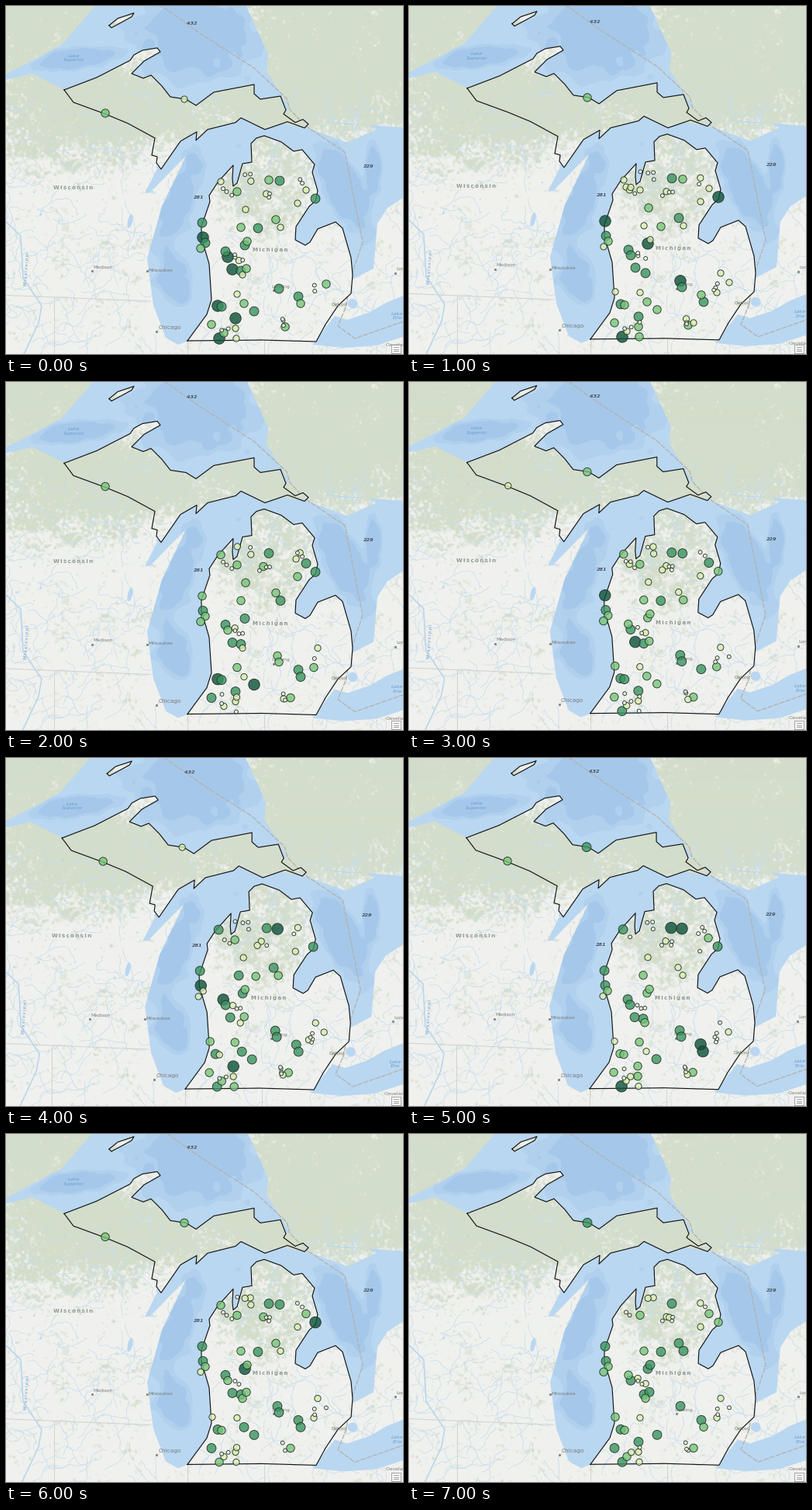
Animation of 512x448 px, one loop 8 s. Source, as a matplotlib script:

```python
import numpy as np
import matplotlib.pyplot as plt
from matplotlib.animation import FuncAnimation
from matplotlib.collections import LineCollection
from matplotlib.colors import to_rgb, to_rgba_array
from matplotlib.patches import PathPatch, Ellipse, Rectangle
from matplotlib.path import Path

W, H, DPI = 512, 448, 100
PT = 72 / DPI
FRAMES = 8
rng = np.random.default_rng(12)

LAND, FOREST = "#f0f1ee", "#d3ddcb"
WATER, DEEP, RIVER = "#bad7f1", "#a3c7ea", "#c9ddec"
GREY, BLUE, INK = "#7b7b7b", "#6d9dcc", "#46525e"

# Key points of the coasts
UPPER = [(75, 108), (117, 92), (160, 70), (165, 63), (176, 57), (195, 54),
         (199, 59), (178, 71), (162, 87), (177, 93), (187, 89), (201, 103),
         (212, 117), (232, 120), (245, 128), (268, 111), (320, 101),
         (320, 113), (328, 120), (354, 116), (361, 134), (358, 139),
         (373, 150), (383, 146), (390, 152), (385, 157), (363, 149),
         (334, 159), (303, 144), (296, 150), (260, 159), (245, 173),
         (246, 162), (225, 174), (200, 210), (194, 202), (195, 194),
         (188, 192), (192, 170), (157, 151), (128, 139), (87, 124)]
LOWER = [(234, 431), (259, 397), (265, 378), (262, 332), (252, 298),
         (252, 284), (263, 252), (262, 244), (273, 227), (293, 205),
         (292, 222), (293, 232), (298, 228), (305, 203), (317, 201),
         (316, 177), (323, 170), (333, 167), (355, 175), (371, 187),
         (382, 185), (398, 204), (395, 214), (402, 238), (399, 251),
         (391, 258), (374, 284), (373, 301), (386, 308), (392, 304),
         (402, 287), (425, 278), (434, 286), (445, 324), (447, 346),
         (445, 370), (428, 386), (412, 410), (400, 432), (331, 430)]
ISLE = [(133, 25), (144, 16), (165, 9), (162, 14), (136, 28)]
MANITOULIN = [(402, 158), (420, 154), (468, 152), (476, 160), (442, 174)]
LAKES = [
    [(-8, 97), (34, 87), (76, 108), (130, 140), (345, 140), (366, 132),
     (336, 84), (338, 62), (318, 18), (306, -8), (122, -8), (72, 50), (-8, 92)],
    [(235, 431), (222, 436), (206, 427), (190, 385), (182, 325), (201, 258),
     (232, 193), (186, 240), (179, 241), (212, 176), (250, 145), (345, 145),
     (345, 300), (300, 431)],
    [(320, 145), (392, 158), (441, 176), (478, 158), (405, 148), (530, 158),
     (530, 235), (492, 260), (479, 280), (474, 338), (447, 352), (340, 320)],
    [(395, 436), (424, 399), (440, 404), (470, 394), (490, 382), (530, 366),
     (530, 420), (478, 437), (436, 440)]]
BORDER = [(180, -8), (205, 3), (250, 35), (320, 80), (362, 119), (366, 133),
          (386, 154), (437, 188), (460, 304), (447, 342), (438, 388),
          (428, 412), (450, 428), (530, 400)]

# Main sites, keyed by their usual level
SITES = {
    4: [(339, 224), (353, 225), (399, 248), (325, 286), (253, 279), (254, 298),
        (283, 316), (286, 323), (308, 308), (292, 339), (303, 341), (350, 356),
        (352, 364), (377, 374), (380, 383), (273, 386), (275, 428), (320, 393),
        (296, 402)],
    3: [(128, 138), (230, 120), (387, 237), (277, 226), (298, 239), (309, 262),
        (303, 285), (348, 275), (354, 285), (257, 305), (251, 312), (311, 303),
        (305, 346), (310, 338), (278, 387), (265, 410), (307, 383), (367, 410)],
    2: [(376, 254), (332, 241), (402, 346), (413, 358), (397, 371), (360, 413),
        (266, 370), (298, 371), (297, 428), (281, 421), (296, 415)]}
# Groups of small sites around these places
TOWNS = [(308, 217), (286, 236), (330, 245), (380, 225), (357, 407),
         (285, 412), (400, 362), (305, 325)]

RADII = np.array([0, 2.4, 4.1, 5.2, 5.9, 7.2])
COLORS = np.array(["#ffffff", "#fdfee6", "#dbeeb0", "#78c679", "#3a9460", "#0b5139"])


def make_sites():
    places = [(x, y, level) for level, group in SITES.items() for x, y in group]
    for x, y in TOWNS:
        places += [(*rng.normal((x, y), (6, 3.5)), 1) for _ in range(4)]
    return np.array(places)


def make_levels(usual):
    shape = (FRAMES, len(usual))
    level = usual + rng.choice([-1, 0, 0, 0, 1], shape)
    seen = rng.random(shape) < np.where(usual == 1, 0.7, 0.9)
    return (np.clip(level, 1, 5) * seen).astype(int)


def smooth(shape, scale):
    fy = np.fft.fftfreq(shape[0])[:, None]
    fx = np.fft.fftfreq(shape[1])[None, :]
    low = np.exp(-2 * (np.pi * scale) ** 2 * (fx ** 2 + fy ** 2))
    field = np.fft.ifft2(np.fft.fft2(rng.normal(size=shape)) * low).real
    return field / field.std()


Y, X = np.mgrid[-10:470, -10:530]


def blob(cx, cy, rx, ry, tilt=0):
    u = X - cx + tilt * (Y - cy)
    return np.exp(-((u / rx) ** 2 + ((Y - cy) / ry) ** 2) ** 2)


def blend(low, high, mix):
    mix = np.clip(mix, 0, 1)[..., None]
    return np.array(to_rgb(low)) * (1 - mix) + np.array(to_rgb(high)) * mix


def terrain():
    cover = (1.4 * blob(20, 15, 150, 85) + 1.5 * blob(460, 55, 170, 115)
             + 0.8 * blob(80, 150, 140, 70) + 1.1 * blob(220, 128, 190, 50)
             + 0.8 * blob(335, 235, 75, 75))
    rough = 0.15 * smooth(X.shape, 7) + 0.25 * smooth(X.shape, 1.3)
    return blend(LAND, FOREST, 1.5 * (cover + rough - 0.3))


def depths():
    depth = (blob(245, 40, 85, 60) + blob(90, 68, 50, 16, 1.5)
             + blob(223, 250, 24, 68, 0.35) + blob(220, 353, 24, 35)
             + blob(435, 235, 30, 60, -0.4) + blob(474, 208, 12, 32))
    depth += 0.12 * smooth(X.shape, 6)
    return blend(WATER, DEEP, 0.4 * (depth > 0.35) + 0.5 * (depth > 0.65))


def streams(n, steps=24):
    lines = []
    for x, y in rng.uniform((-10, 100), (520, 460), (n, 2)):
        turn = rng.uniform(0, 2 * np.pi) + np.cumsum(rng.normal(0, 0.35, steps))
        lines.append(np.column_stack([x + 2.2 * np.cumsum(np.cos(turn)),
                                      y + 2.2 * np.cumsum(np.sin(turn))]))
    return lines


fig = plt.figure(figsize=(W / DPI, H / DPI), dpi=DPI, facecolor=LAND)
ax = fig.add_axes([0, 0, 1, 1])
ax.axis("off")


def clip_shape(*shapes):
    path = Path.make_compound_path(*[Path(s + s[:1]) for s in shapes])
    return ax.add_patch(PathPatch(path, fc="none", ec="none"))


def picture(rgb, z, clip=None):
    im = ax.imshow(rgb, extent=(-10, 530, 470, -10), aspect="auto", zorder=z)
    if clip:
        im.set_clip_path(clip)


def draw_land(z, clip=None):
    picture(ground, z, clip)
    net = LineCollection(rivers, colors=RIVER, linewidths=0.8 * PT, zorder=z + 0.2)
    ax.add_collection(net)
    if clip:
        net.set_clip_path(clip)


def line(points, color, width, z, **kw):
    ax.plot(*zip(*points), color=color, lw=width * PT, zorder=z, **kw)


def label(x, y, text, size=6.2, color=GREY, **kw):
    kw = dict(ha="center", va="center", family="DejaVu Sans", zorder=6,
              clip_on=True) | kw
    return ax.text(x, y, text, fontsize=size * PT, color=color, **kw)


def spaced(word):
    return "\u2009".join(word)


def sounding(x, y, text):
    return label(x, y, text, 6.5, INK, style="italic", weight="bold")


def region(x, y, text):
    return label(x, y, spaced(text), 7, "#929a92", weight="bold")


def town(x, y):
    return ax.plot(x, y, "s", ms=1.6 * PT, color="#888888", zorder=6)[0]


# Land, then lakes, then the peninsulas over the lakes
ground, rivers = terrain(), streams(280)
draw_land(0)
for cx, cy in rng.uniform((0, 105), (200, 300), (60, 2)):
    ax.add_patch(Ellipse((cx, cy), *rng.uniform(1, 3, 2), fc=WATER, zorder=0.5))
for cx, cy, w, h in [(160, 277, 6, 18), (447, 383, 13, 12)]:
    ax.add_patch(Ellipse((cx, cy), w, h, angle=12, fc=WATER, zorder=1))
picture(depths(), 1, clip_shape(*LAKES))
draw_land(3, clip_shape(UPPER, LOWER, ISLE, MANITOULIN))

line([(-8, 270), (19, 296), (22, 350), (46, 386), (42, 408), (20, 455)],
     "#b8d5ec", 1.6, 0.6)
line([(-8, 372), (62, 375), (186, 380)], "#d2d2ce", 1, 0.7)
for x in (62, 234, 333):
    line([(x, 375 if x == 62 else 431), (x, 460)], "#d2d2ce", 1, 0.7)
line(BORDER, "#b4b1ad", 1.3, 2.5, ls=(0, (5, 1.2)))
for coast in (UPPER, LOWER, ISLE):
    line(coast + coast[:1], "#111111", 1.15, 5, solid_joinstyle="round")

# These vanish at the last survey
fading = [
    sounding(240, 23, "432"), sounding(249, 246, "281"),
    label(88, 67, "Lake\nSuperior", 6.5, BLUE, style="italic"),
    region(87, 234, "Wisconsin"), label(125, 336, "Madison"), town(111, 341),
    label(27, 338, spaced("Mississippi"), 6, BLUE, rotation=86, style="italic")]
sounding(468, 207, "229")
region(341, 314, "Michigan")
label(199, 340, "Milwaukee", 6)
label(211, 414, "Chicago", 7.4)
label(354, 361, "Lansing")
label(430, 385, "Detroit", 6)
label(503, 339, "London", 6, ha="left")
label(505, 399, "Lake\nErie", 6.5, BLUE, style="italic")
label(490, 437, "Cleveland", 6, ha="left")
for spot in [(182, 341), (194, 419), (345, 366), (502, 344)]:
    town(*spot)

# Fixed legend button
screen = dict(transform=fig.transFigure, zorder=9)
ax.add_patch(Rectangle((497 / W, 1 / H), 12 / W, 11 / H, fc="#f7f7f7",
                       ec="#8f8f8f", lw=0.8 * PT, **screen))
for y in (4, 6.5, 9):
    ax.plot([500 / W, 506 / W], [y / H, y / H], color="#8f8f8f", lw=0.8 * PT, **screen)

sites = make_sites()
levels = make_levels(sites[:, 2])
dots = ax.scatter([], [], edgecolors="#26352b", linewidths=0.9 * PT, zorder=7)


def update(t):
    # The map settles upwards and briefly slips left
    dx = -3 * np.exp(-((t - 4.2) / 0.75) ** 2)
    dy = -6 * (1 - np.exp(-t / 2.3))
    ax.set_xlim(-dx, W - dx)
    ax.set_ylim(H - dy, -dy)

    # Large dots first, so small ones stay visible
    order = np.argsort(-levels[t], kind="stable")
    order = order[levels[t][order] > 0]
    shown = levels[t][order]
    dots.set_offsets(sites[order, :2])
    dots.set_sizes((2 * RADII[shown] * PT) ** 2)
    dots.set_facecolor(to_rgba_array(list(COLORS[shown]), 0.8))
    for item in fading:
        item.set_visible(t < FRAMES - 1)
    return [dots]


anim = FuncAnimation(fig, update, frames=FRAMES, interval=1000, repeat=True,
                     repeat_delay=0, blit=False)
plt.show()
```
